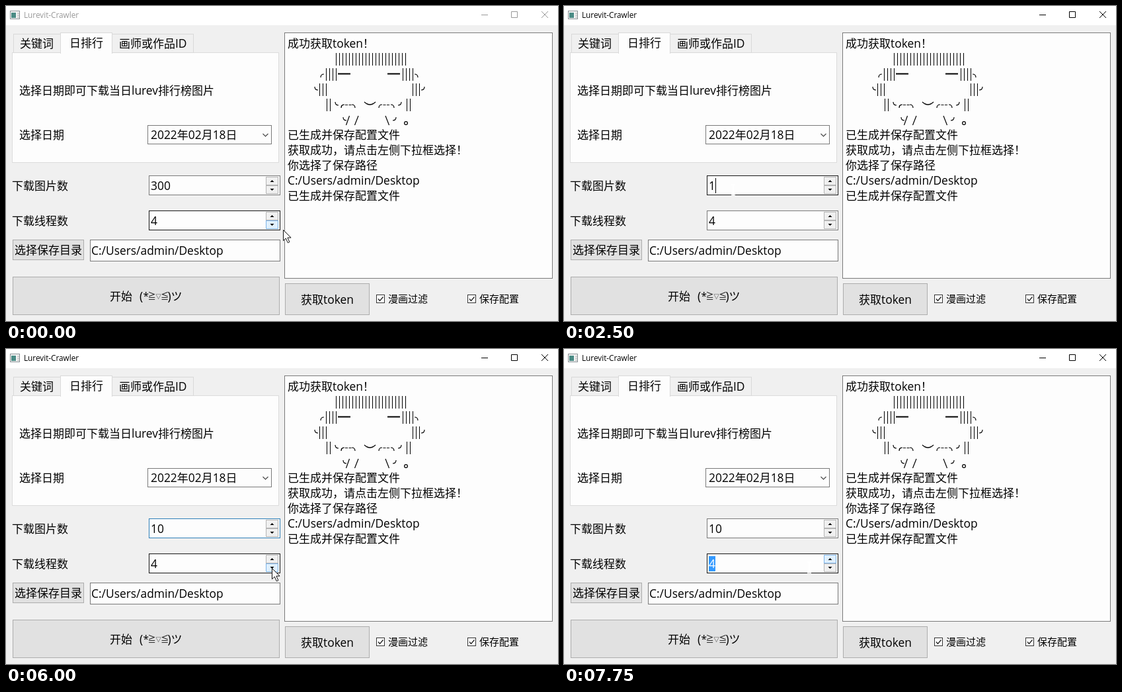
Animation of 835x476 px, one loop 8 s. Source, as an HTML page:

```html
<!DOCTYPE html>
<html lang="zh-CN">
<head>
<meta charset="utf-8">
<style>
html, body { margin: 0; width: 100%; height: 100%; overflow: hidden; background: #f0f0f0; }
svg { display: block; width: 100vw; height: 100vh; }
text { font-family: "Open Sans", "Noto Sans", "Noto Sans CJK SC", sans-serif; white-space: pre; }
.cjk { font-family: "Noto Sans CJK SC", "Noto Sans CJK", sans-serif; }
.mark { font-family: "Noto Sans CJK TC", "Noto Sans CJK", sans-serif; }
</style>
</head>
<body>
<svg id="stage" viewBox="0 0 835 476"></svg>
<script>
const LOOP = 8000;
const GREY = '#7a7a7a', DARK = '#171717', BLUE = '#3399ff', WHITE = '#fdfdfd';
const INK = '#000';

// Box given by its outer edges, with a crisp 1px border.
const box = (x1, y1, x2, y2, fill, stroke, id = '') =>
  `<rect id="${id}" x="${x1 + .5}" y="${y1 + .5}" width="${x2 - x1 - 1}" height="${y2 - y1 - 1}" fill="${fill}" stroke="${stroke}"/>`;

const path = (d, stroke = INK, width = 1.2) =>
  `<path d="${d}" fill="none" stroke="${stroke}" stroke-width="${width}"/>`;

// Chinese runs are set slightly smaller than Latin ones, with centred punctuation.
// y is the middle of the line.
function label(x, y, str, size = 17, attrs = '') {
  const runs = str.match(/[，！]|[\u2e80-\ufeff]+|[^\u2e80-\uffef]+/g).map(run => {
    const kind = /[，！]/.test(run) ? 'mark' : /[\u2e80-\ufeff]/.test(run) ? 'cjk' : '';
    return `<tspan class="${kind}" font-size="${kind ? size : size * 1.024}">${run}</tspan>`;
  });
  return `<text x="${x}" y="${Math.round(y + size * .365)}" fill="${INK}" ${attrs}>${runs.join('')}</text>`;
}

const bars = (x, y, n, h = 19) =>
  Array.from({ length: n }, (_, i) => `M${x + i * 5} ${y - h / 2}v${h}`).join('');

// Small quarter arcs, named by the corner they round.
const arc = {
  tl: (x, y) => `M${x} ${y + 5}q0-5 5-5`,
  tr: (x, y) => `M${x} ${y}q5 0 5 5`,
  bl: (x, y) => `M${x} ${y}q0 5 5 5`,
  br: (x, y) => `M${x + 5} ${y}q0 5-5 5`
};

function face() {
  const hair = bars(499.5, 80.5, 22) + bars(484.5, 103.5, 4) + bars(600.5, 103.5, 4)
    + bars(474.5, 126.5, 3) + bars(615.5, 126.5, 3)
    + bars(485.5, 149.5, 2) + bars(606.5, 149.5, 2);
  const curves = arc.tl(476, 103) + arc.tr(618, 103) + arc.bl(467, 122) + arc.br(628, 122)
    + arc.bl(498, 145) + arc.tl(507, 149)
    + 'M513 149.5h4m1.5 0h4' + arc.tr(523, 149) + 'M542 145q8.5 8 17 0'
    + arc.tl(564, 149) + 'M570.5 149.5h4m1.5 0h4' + arc.tr(582, 149)
    + arc.br(593, 145) + arc.bl(510, 168)
    + 'M514.5 180l5-14M527.5 180l5.5-14M574 166l5.5 14' + arc.br(585, 168);
  return path(hair, INK, 1) + path(curves) + path('M502 102.5h19M577 102.5h19', INK, 2)
    + '<circle cx="605" cy="177" r="2.4" fill="none" stroke="#000" stroke-width="1.2"/>';
}

function spin(id, y) {
  const button = (dir, top) => box(393, top, 412, top + 13, '#f0f0f0', '#b4b4b4', id + dir);
  return box(216, y, 415, y + 30, WHITE, GREY, id + 'Box')
    + `<rect id="${id}Sel" x="219" y="${y + 4}" width="0" height="23" fill="${BLUE}"/>`
    + `<text id="${id}Text" x="219" y="${y + 22}" font-size="17.4"></text>`
    + `<path id="${id}Caret" d="M0 ${y + 4}v23" stroke="#000"/>`
    + button('Up', y + 2) + button('Down', y + 15)
    + `<path d="M399.5 ${y + 10}h6l-3-3zM399.5 ${y + 20}h6l-3 3z" fill="#000"/>`;
}

const check = (x, str) => box(x, 436, x + 13, 449, WHITE, '#333')
  + path(`M${x + 3} 442.5l2.5 3 5-6`, '#222', 1.3) + label(x + 18, 443, str, 15);

const emoticon = [['(', 202, 17], ['*', 207.5, 15], ['≧', 214.5, 12], ['▽', 226.5, 8],
  ['≦', 234, 12], [')', 244.5, 17], ['ツ', 249.5, 17]]
  .map(([c, x, size]) => label(x, 439, c, size)).join('');

const logLines = [[57, '成功获取token！'], [195, '已生成并保存配置文件'], [218, '获取成功，请点击左侧下拉框选择！'],
  [241, '你选择了保存路径'], [264, 'C:/Users/admin/Desktop'], [287, '已生成并保存配置文件']];

const stage = document.getElementById('stage');
stage.innerHTML = [
  '<rect width="835" height="476" fill="#f0f0f0"/><rect width="835" height="29" fill="#fff"/>',
  box(6, 7, 21, 20, '#f4f4f4', '#8a9296'),
  '<rect x="8" y="10" width="7" height="8" fill="#4b8c86"/><path d="M17 11h3M17 14h3M17 17h3" stroke="#aaa"/>',
  '<g id="title">', label(27, 14, 'Lurevit-Crawler', 11.5, 'style="fill:inherit"'),
  '<path d="M719 13.5h10M764.5 8.5h9v9h-9zM810 8l10 10M820 8l-10 10" fill="none"/></g>',

  box(9, 70, 413, 237, WHITE, '#dcdcdc'),
  box(11, 42, 83, 71, '#f0f0f0', '#d9d9d9'), box(160, 42, 284, 71, '#f0f0f0', '#d9d9d9'),
  box(82, 40, 161, 72, WHITE, '#d9d9d9'), `<rect x="83" y="69" width="77" height="4" fill="${WHITE}"/>`,
  label(21, 57, '关键词'), label(96, 56, '日排行'), label(171, 57, '画师或作品ID'),
  label(20, 128, '选择日期即可下载当日lurev排行榜图片'), label(20, 195, '选择日期'),
  box(214, 180, 402, 209, WHITE, GREY), label(219, 195, '2022年02月18日'),
  path('M388.5 193l4 4 4-4', '#444', 1.1),

  label(9, 272, '下载图片数'), spin('count', 256),
  label(9, 325, '下载线程数'), spin('thread', 309),
  box(10, 353, 118, 384, '#e1e1e1', '#adadad'), label(13, 369, '选择保存目录'),
  box(127, 353, 415, 386, WHITE, GREY), label(129, 370, 'C:/Users/admin/Desktop'),
  box(10, 409, 414, 467, '#e1e1e1', '#adadad'), label(157, 439, '开始'), emoticon,

  box(421, 40, 827, 412, WHITE, GREY),
  ...logLines.map(([y, str]) => label(426, y, str)), face(),
  box(422, 419, 550, 467, '#e1e1e1', '#adadad'), label(446, 444, '获取token'),
  check(560, '漫画过滤'), check(698, '保存配置'),

  '<path id="arrow" d="M.5.5v16.2l3.8-3.6 3 6.7 2.6-1.2-3-6.5h5.2z" fill="#fff" stroke="#111"/>',
  '<path id="beam" d="M-3-8h2.5l.5 1 .5-1H3M0-7V7M-3 8h2.5l.5-1 .5 1H3" fill="none" stroke="#fff" stroke-width="1.4"/>'
].join('');

const el = {};
stage.querySelectorAll('[id]').forEach(node => { if (node.id) el[node.id] = node; });

// Each step changes only the named parts of the state.
const steps = [
  [0, { active: false, cursor: 'arrow', x: 419, y: 338, count: '300', thread: '4', sel: '',
    caret: false, countEdge: GREY, threadEdge: DARK, hot: 'threadDown' }],
  [500, { x: 404, y: 292, threadEdge: GREY, hot: '' }],
  [750, { cursor: 'beam', x: 330, y: 272, countEdge: DARK }],
  [1000, { x: 262 }],
  [1250, { x: 240, active: true, caret: true }],
  [1500, { cursor: 'arrow', x: 227, y: 271, sel: 'count', caret: false }],
  [1750, { x: 236 }],
  [2000, { cursor: 'beam', x: 256, y: 278 }],
  [2500, { sel: '', count: '1', caret: true }],
  [2750, { count: '10' }],
  [3000, { count: '100', caret: false }],
  [3750, { caret: true }],
  [4000, { count: '10' }],
  [4250, { count: '' }],
  [4750, { count: '1' }],
  [5000, { count: '10' }],
  [5500, { caret: false }],
  [5750, { x: 350, y: 275 }],
  [6000, { cursor: 'arrow', x: 402, y: 331, countEdge: '#2f80b8', threadEdge: DARK, hot: 'threadDown' }],
  [6250, { thread: '3', sel: 'thread' }],
  [6500, { x: 412, y: 336 }],
  [6750, { x: 423, y: 341 }],
  [7000, { x: 410, y: 328, countEdge: GREY }],
  [7250, { x: 403, y: 318, hot: 'threadUp' }],
  [7500, { thread: '4' }],
  [7750, { cursor: 'beam', x: 371, y: 330 }]
];

const set = (node, attrs) => { for (const k in attrs) node.setAttribute(k, attrs[k]); };

function drawSpin(id, s) {
  const str = s[id], chosen = s.sel === id;
  const end = 219 + str.length * 9.96;
  el[id + 'Text'].textContent = str;
  set(el[id + 'Text'], { fill: chosen ? '#fff' : INK });
  set(el[id + 'Sel'], { width: chosen ? Math.round(end) - 219 : 0 });
  set(el[id + 'Box'], { stroke: s[id + 'Edge'] });
  set(el[id + 'Caret'], {
    transform: `translate(${Math.round(end) + .5})`,
    visibility: id === 'count' && s.caret ? 'visible' : 'hidden'
  });
  for (const dir of ['Up', 'Down']) {
    const hot = s.hot === id + dir;
    set(el[id + dir], { fill: hot ? '#e0f0fd' : '#f0f0f0', stroke: hot ? '#7eb4ea' : '#b4b4b4' });
  }
}

function draw(t) {
  const s = Object.assign({}, ...steps.filter(([at]) => at <= t).map(([, change]) => change));
  const ink = s.active ? '#000' : '#999';
  set(el.title, { fill: ink, stroke: 'none' });
  set(el.title.lastElementChild, { stroke: ink });
  drawSpin('count', s);
  drawSpin('thread', s);
  for (const kind of ['arrow', 'beam']) {
    set(el[kind], {
      transform: `translate(${s.x} ${s.y})`,
      visibility: s.cursor === kind ? 'visible' : 'hidden'
    });
  }
}

const start = performance.now();
function tick() {
  draw((performance.now() - start) % LOOP);
  requestAnimationFrame(tick);
}
tick();
</script>
</body>
</html>
```
